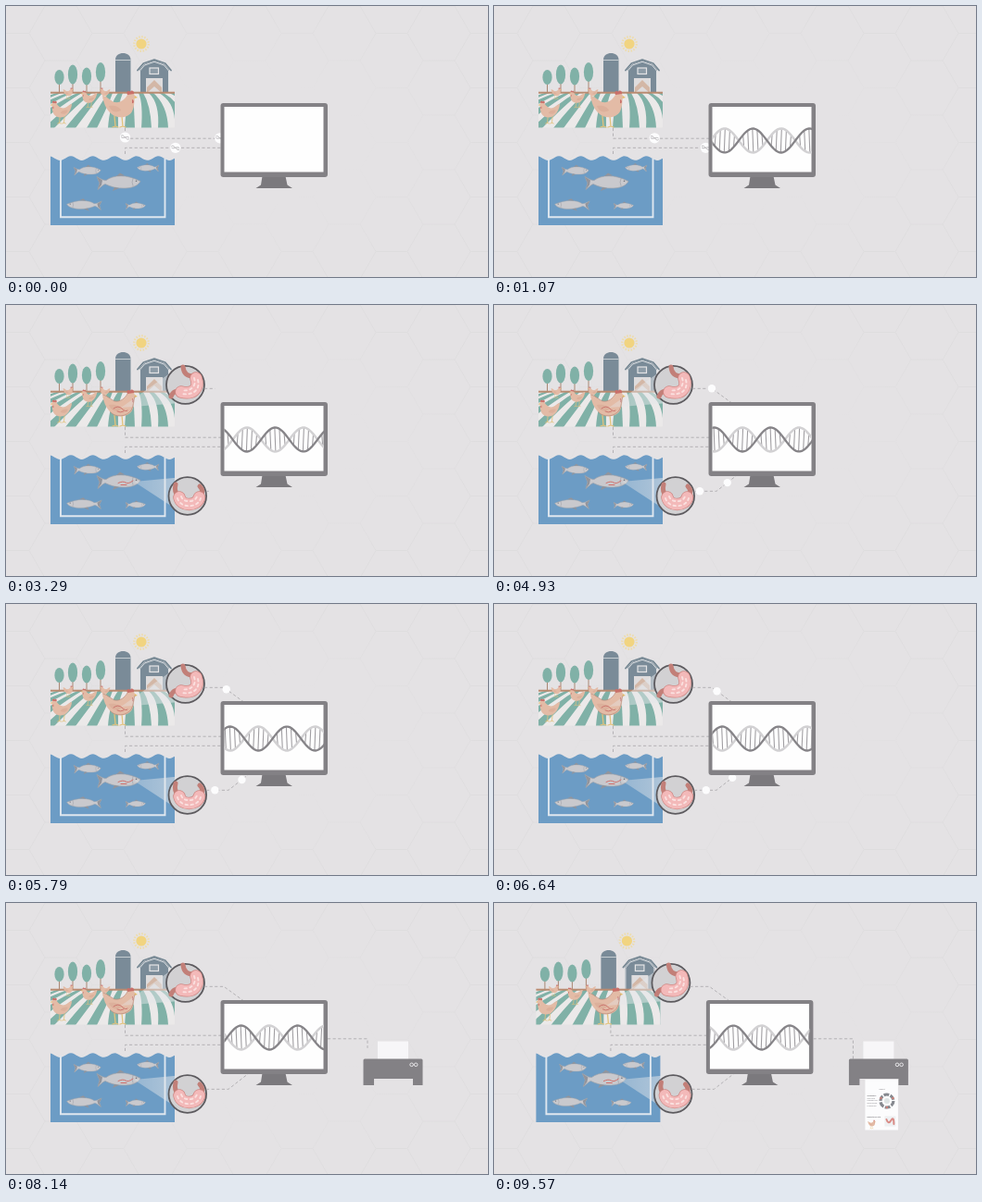
Write an HTML page that moves like this. It is 520 px wide and 293 px high and loops after 9640 ms.

```html
<!DOCTYPE html>
<html lang="en">
<head>
<meta charset="utf-8">
<title>Farm to lab</title>
<style>
  html, body { margin: 0; width: 100%; height: 100%; overflow: hidden; background: #e4e2e4; }
  svg { display: block; width: 100vw; height: 100vh; }
  .dash { fill: none; stroke: #b3b1b4; stroke-width: 1; stroke-dasharray: 3.2 2.4; }
  .line { fill: none; stroke-linecap: round; stroke-linejoin: round; }
  text { font-family: "Open Sans", sans-serif; font-size: 2.1px; fill: #77757a; }
</style>
</head>
<body>
<svg viewBox="0 0 520 293" preserveAspectRatio="none">
  <defs>
    <pattern id="hex" width="102" height="59" x="25" patternUnits="userSpaceOnUse">
      <path d="M0 29.5 17 0H51L68 29.5H102M68 29.5 51 59H17L0 29.5" fill="none" stroke="#dbd9db" stroke-width=".8"/>
    </pattern>
    <radialGradient id="vignette">
      <stop offset=".45" stop-color="#e4e2e4"/>
      <stop offset="1" stop-color="#e4e2e4" stop-opacity=".25"/>
    </radialGradient>
    <linearGradient id="beam">
      <stop offset="0" stop-color="#e4e6e9" stop-opacity=".35"/>
      <stop offset="1" stop-color="#e4e6e9" stop-opacity=".6"/>
    </linearGradient>
    <clipPath id="fieldClip"><rect x="48" y="94" width="134" height="37.5"/></clipPath>
    <clipPath id="screenClip"><rect x="235.5" y="109" width="107.5" height="70.5"/></clipPath>
    <clipPath id="trayClip"><rect x="395" y="191" width="50" height="70"/></clipPath>
    <clipPath id="topGrow"><rect id="topGrowBox" x="212" y="80" width="0" height="40"/></clipPath>
    <clipPath id="lowGrow"><rect id="lowGrowBox" x="214" y="175" width="0" height="40"/></clipPath>

    <g id="hen">
      <path d="M-5 9-4 20M3 9 4 20M-7 21-4 20-1 21M1 21 4 20 7 21" class="line" stroke="#e3c27c" stroke-width="1.3"/>
      <path d="M-18-13C-14-13-10-8-5-6C2-5 6-9 9-14C11-18 17-17 17-12C16-7 17-2 14 4C10 11-2 13-9 6C-14 2-17-6-18-13Z" fill="#e3bba6"/>
      <path d="M-11-2C-5-3 1-1 2 3C-4 6-9 4-11-2Z" fill="#dcb09b"/>
      <path d="M9-14C7-18 11-19 12-17C13-20 17-18 16-15ZM14-9C17-8 16-4 14-5Z" fill="#c9706a"/>
      <path d="M17-13 20-11 16.500-10Z" fill="#e3bd68"/>
    </g>
    <g id="fish">
      <path d="M-24-6C-20-4-18-2-14-2C-6-8 8-9 23-1C21 3 16 6 7 6.500C-2 7-9 5-15 2C-18 3-20 6-23 8L-21 1Z" fill="#c9c9cd" stroke="#a0a3aa" stroke-width=".7"/>
      <path d="M-24-6-18-2-19 3-23 8-21 1ZM-3-6.500 1-10 6-7.200ZM-5 5.500-7 9.500 0 6.500Z" fill="#92949b"/>
      <path d="M15-4Q13 0 15 4" class="line" stroke="#a0a2a9" stroke-width=".7"/>
      <circle cx="18.5" cy="-1.3" r=".8" fill="#6d7078"/>
    </g>
    <g id="ball">
      <circle r="5.6" fill="#fcfcfd"/>
      <path d="M-4-2C-1-4 1 4 4 2M-4 0C-2 2 2-2 4 0" class="line" stroke="#b9b7ba" stroke-width="1"/>
    </g>
  </defs>

  <rect width="520" height="293" fill="#e4e2e4"/>
  <rect width="520" height="293" fill="url(#hex)"/>
  <rect width="520" height="293" fill="url(#vignette)"/>

  <g id="scene">
    <g id="farm">
      <circle cx="146" cy="41" r="5.6" fill="#f1d480"/>
      <circle cx="146" cy="41" r="7.8" fill="none" stroke="#eedcaa" stroke-width="2.2" stroke-dasharray="1.5 1.56"/>
      <g id="trees"></g>
      <path d="M118 94V58C118 48.500 134.500 48.500 134.500 58V94Z" fill="#7a8b98"/>
      <path d="M118 58.500H134.500" stroke="#cfd4d8" stroke-width=".9"/>
      <path d="M144 94V69L149 63 160 59 171 63 176 69V94Z" fill="#7a8b98"/>
      <path d="M142 69.500 148.300 62 160 58.200 171.700 62 178 69.500" class="line" stroke="#748692" stroke-width="1.800"/>
      <path d="M144.500 93V70L149.500 64 160 60.300 170.500 64 175.500 70V93" class="line" stroke="#dcdfe2" stroke-width="1"/>
      <rect x="155" y="67" width="9.500" height="6.500" fill="#8e9ca7" stroke="#e4e4e6" stroke-width="1.200"/>
      <path d="M151 94V78H169V94Z" fill="#dedcdd"/>
      <path d="M152 94V88L160 80 168 88V94L160 87Z" fill="#d3b7a6"/>
      <rect x="48" y="94" width="134" height="37.500" fill="#ebe9e9"/>
      <g id="rows" clip-path="url(#fieldClip)" fill="#80b1a7"></g>
      <rect x="48" y="92.700" width="134" height="2" fill="#b98a70"/>
      <use href="#hen" transform="translate(67 94) scale(.3)"/>
      <use href="#hen" transform="translate(107 94) scale(-.3 .3)"/>
      <use href="#hen" transform="translate(90 100) scale(-.46 .46)"/>
      <use href="#hen" transform="translate(60 114) scale(-.62 .62)"/>
      <use href="#hen" transform="translate(122 110)"/>
    </g>

    <g id="pool">
      <path id="water" fill="#6c9cc5"/>
      <path d="M59 165V228.300H171.500V165" fill="none" stroke="#dfe7ef" stroke-width="1.900"/>
      <use href="#fish" transform="translate(88 178) scale(.62)"/>
      <use href="#fish" transform="translate(153 175) scale(-.5 .5)"/>
      <use href="#fish" transform="translate(122 190.500)"/>
      <use href="#fish" transform="translate(84 215) scale(-.8 .68)"/>
      <use href="#fish" transform="translate(140 216) scale(.46)"/>
    </g>

    <path class="dash" d="M128.500 132V143.200H232"/>
    <path class="dash" d="M128.500 160V153.300H232"/>
    <g id="balls"></g>

    <g id="organs" opacity="0">
      <path d="M124 111 185 68 187 106Z" fill="url(#beam)"/>
      <path d="M105 97C109 98 113 102 117 104C124 105 128 101 131 96M113 116C118 122 130 121 135 114C138 109 137 104 139 99" class="line" stroke="#b98b7b" stroke-width=".7"/>
      <path d="M116 112Q121 108 125 112T131 114M120 115Q123 117 127 115" class="line" stroke="#cb756d" stroke-width="1"/>
      <path d="M138 191 192 186 190 225Z" fill="url(#beam)"/>
      <path d="M121 192.500Q126 190 129 192T137 190M124 194.500H130" class="line" stroke="#d0706b" stroke-width="1"/>

      <circle cx="193.500" cy="86.300" r="20.500" fill="#d2d1d3" stroke="#5d5b5f" stroke-width="1.800"/>
      <g class="line">
        <path d="M191 67Q192 77 202 77M189 94Q181 91 178 99" stroke="#c27f78" stroke-width="5"/>
        <path d="M205 79C209 91 201 97 189 94" stroke="#cf8783" stroke-width="13.500"/>
        <path d="M205 79C209 91 201 97 189 94" stroke="#f3b9b9" stroke-width="12"/>
        <path d="M203 79C206 88 199 94 189 92M207 81C210 92 201 98 190 96" stroke="#fae0df" stroke-width="1.900" stroke-dasharray="2.500 3.500"/>
      </g>

      <circle cx="195.800" cy="206.500" r="20.300" fill="#d2d1d3" stroke="#5d5b5f" stroke-width="1.800"/>
      <g class="line">
        <path d="M183 194Q181 202 186 207M210 207Q214 201 209 196" stroke="#c27f78" stroke-width="5"/>
        <path d="M187 208C189 218 206 218 208.500 208" stroke="#cf8783" stroke-width="13.500"/>
        <path d="M187 208C189 218 206 218 208.500 208" stroke="#f3b9b9" stroke-width="12"/>
        <path d="M189 207C191 214 204 214 206 207M185 209C188 220 207 220 210 209" stroke="#fae0df" stroke-width="1.900" stroke-dasharray="2.500 3.500"/>
      </g>
    </g>

    <path class="dash" clip-path="url(#topGrow)" d="M214 90.300H235L258 107"/>
    <path class="dash" clip-path="url(#lowGrow)" d="M216 201.300H240L262 184"/>
    <g id="dots" fill="#fcfcfd"></g>

    <path d="M276.500 184H301.500L303.500 193.500 309 197H269.500L275 193.500Z" fill="#7b797d"/>
    <rect x="231.500" y="105" width="115.500" height="80" rx="3" fill="#838185"/>
    <rect x="235.500" y="109" width="107" height="70.500" fill="#fefefe"/>
    <g id="dna" clip-path="url(#screenClip)" fill="none">
      <path id="rungs" stroke="#a09ea2" stroke-width="1.100"/>
      <path id="back" stroke="#d2d1d3" stroke-width="2.500"/>
      <path id="front" stroke="#868488" stroke-width="2.300"/>
    </g>

    <path id="outLine" class="dash"/>
    <g id="printer">
      <rect x="401" y="149.500" width="33" height="20" fill="#f7f6f8"/>
      <path d="M387 168.500H448Q449.500 168.500 449.500 170V197H439V190H397V197H385.500V170Q385.500 168.500 387 168.500Z" fill="#838185"/>
      <g fill="none" stroke="#f0eff1" stroke-width=".9">
        <circle cx="437.600" cy="174.800" r="1.800"/><circle cx="442.200" cy="174.800" r="1.800"/>
      </g>
    </g>
    <g clip-path="url(#trayClip)">
      <g id="report">
        <rect x="403" y="188" width="35.500" height="57.500" fill="#fcfcfd"/>
        <text x="418" y="202">Report</text>
        <text x="405" y="208.500" font-weight="700">Summary</text>
        <g id="copy"></g>
        <circle cx="426.500" cy="214" r="7" fill="none" stroke="#86898f" stroke-width="3.200" stroke-dasharray="5.800 1.530"/>
        <circle cx="426.500" cy="214" r="3" fill="#dfe5e5"/>
        <g fill="#cf7f77">
          <circle cx="420" cy="211" r="1.200"/><circle cx="433" cy="211" r="1.200"/><circle cx="426.500" cy="221" r="1.200"/>
        </g>
        <text x="405" y="231.500" font-weight="700">Results by site</text>
        <use href="#hen" transform="translate(410 239) scale(.23)"/>
        <rect x="424" y="230.500" width="12" height="11" fill="#eef0f2"/>
        <path d="M426 234Q428 240 431 235T434 239" class="line" stroke="#d98b86" stroke-width="2"/>
      </g>
    </g>
  </g>
</svg>
<script>
  const LOOP = 9640, FPS = 14, SPEED = 42.5;
  const $ = id => document.getElementById(id);
  const make = (parent, tag, attrs) => {
    const el = document.createElementNS('http://www.w3.org/2000/svg', tag);
    for (const k in attrs) el.setAttribute(k, attrs[k]);
    return $(parent).appendChild(el);
  };
  const ramp = (t, a, b) => Math.min(1, Math.max(0, (t - a) / (b - a)));
  const easeOut = p => 1 - (1 - p) ** 3;
  const set = (id, name, value) => $(id).setAttribute(name, value);

  // Static scenery
  for (const [x, y, ry] of [[57.5, 77, 8], [72, 74, 10.5], [87, 76, 9.5], [102, 71.5, 10.5]]) {
    make('trees', 'path', { d: `M${x} ${y}V94`, stroke: '#a98672', 'stroke-width': 1 });
    make('trees', 'ellipse', { cx: x, cy: y, rx: 5.1, ry, fill: '#80b1a7' });
  }
  // Furrows fan out to the left and bend downhill on the right
  for (let i = -6; i <= 5; i++) {
    const top = 121 + i * 11, low = 110 + i * (i < 0 ? 23 : 18);
    const bend = i < 0 ? (top + low) / 2 + 4 : low + 2;
    make('rows', 'path', {
      d: `M${top} 94Q${bend} 105 ${low} 132H${low + 11}Q${bend + 8} 107 ${top + 5} 94Z`
    });
  }
  let wave = 'M48 237V164';
  for (let x = 48; x <= 182; x += 2) wave += `L${x} ${164.6 - 2.3 * Math.cos((x - 70) / 23.6 * 2 * Math.PI)}`;
  set('water', 'd', wave + 'V237Z');
  ['Gut flora', 'mapped for', 'each group', 'of animals'].forEach((s, i) =>
    make('copy', 'text', { x: 405, y: 211.5 + i * 2.8 }).textContent = s);

  // Points along the dashed routes
  const along = (pts, d) => {
    for (let i = 1; i < pts.length; i++) {
      const [x, y] = pts[i - 1], dx = pts[i][0] - x, dy = pts[i][1] - y, len = Math.hypot(dx, dy);
      if (d <= len) return [x + dx * d / len, y + dy * d / len];
      d -= len;
    }
    return pts[pts.length - 1];
  };
  const FARM = [[128.5, 132], [128.5, 142.8], [238, 142.8]];
  const POOL = [[128.5, 160], [128.5, 153.3], [238, 153.3]];
  const TOP = [[214, 90.3], [235, 90.3], [262, 110]];
  const LOW = [[216, 201.3], [240, 201.3], [266, 181]];

  const balls = [[FARM, 10], [FARM, 113], [POOL, 61], [POOL, -61]].map(([path, from]) =>
    ({ path, from, el: make('balls', 'use', { href: '#ball' }) }));
  const dots = [];
  for (const [path, from, len] of [[TOP, 21, 50], [LOW, 6, 54]])
    for (let i = 0; i < 2; i++)
      dots.push({ path, from, len, i, el: make('dots', 'circle', { r: 4.2 }) });

  function helix(t) {
    const period = 61, peak = 285 + 5 * (t - 2.21);
    const y = (x, sign) => 145.5 - sign * 13 * Math.cos((x - peak) / period * 2 * Math.PI);
    let front = '', back = '', rungs = '';
    for (let x = 234; x <= 346; x += 2) {
      const cmd = front ? 'L' : 'M';
      front += `${cmd}${x} ${y(x, 1).toFixed(2)}`;
      back += `${cmd}${x} ${y(x, -1).toFixed(2)}`;
    }
    for (let i = -24; i <= 24; i++) {
      if ((i + 24) % 6 === 3) continue;
      const x = peak + i * period / 12, tilt = .5;
      rungs += `M${x - tilt} ${y(x - tilt, 1)}L${x + tilt} ${y(x + tilt, -1)}`;
    }
    set('front', 'd', front);
    set('back', 'd', back);
    set('rungs', 'd', rungs);
    set('dna', 'opacity', ramp(t, .15, .9));
  }

  function draw(t) {
    for (const b of balls) {
      const d = b.from + SPEED * t, [x, y] = along(b.path, d);
      b.el.setAttribute('transform', `translate(${x} ${y})`);
      b.el.setAttribute('opacity', d < 0 ? 0 : 1);
    }
    set('balls', 'opacity', 1 - ramp(t, 2.3, 2.75));
    helix(t);
    set('organs', 'opacity', ramp(t, 2.35, 2.95));

    set('topGrowBox', 'width', 50 * ramp(t, 3.1, 3.8));
    set('lowGrowBox', 'width', 50 * ramp(t, 3.22, 3.9));
    const gap = 33;
    for (const c of dots) {
      const shift = c.from + SPEED * (t - 4.93);
      const d = ((shift % gap) + gap) % gap + c.i * gap;
      const [x, y] = along(c.path, d);
      c.el.setAttribute('cx', x);
      c.el.setAttribute('cy', y);
      c.el.setAttribute('opacity', d > c.len || d > SPEED * (t - 3.7) ? 0 : 1);
    }
    set('dots', 'opacity', 1 - ramp(t, 7.1, 7.5));

    const slide = 140 * (1 - easeOut(ramp(t, 7.2, 8.2)));
    set('printer', 'transform', `translate(${slide} 0)`);
    const reach = 65 * ramp(t, 7.45, 8.3), across = Math.min(43, reach);
    set('outLine', 'd', reach ? `M347 146.800h${across}v${Math.max(0, reach - 43)}` : '');
    const out = ramp(t, 8.4, 9.571);
    set('report', 'transform', `translate(0 ${-57 * (1 - out)})`);
    set('scene', 'transform', `translate(${-2.6 * ramp(t, 9.15, 9.571) ** 2} 0)`);
  }

  function frame() {
    const ms = performance.now() % LOOP;
    draw(Math.floor((ms + 5) * FPS / 1000) / FPS);
    requestAnimationFrame(frame);
  }
  frame();
</script>
</body>
</html>
```
